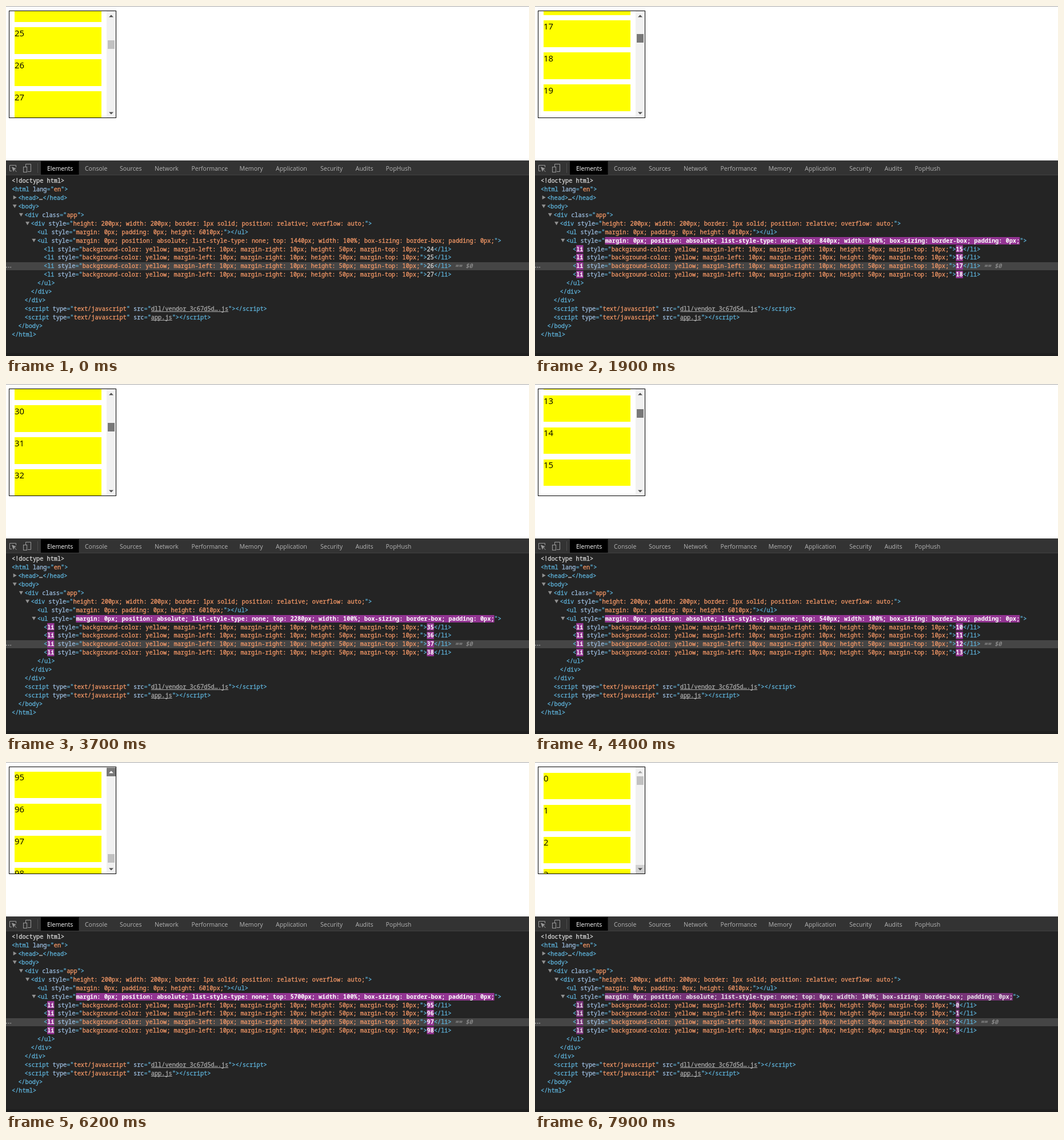
Recreate the animation shown at these times as an HTML page with a canvas. Size 915 by 612 pixels, loop 8 s.

```html
<!DOCTYPE html>
<html lang="en">
<head>
<meta charset="utf-8">
<title>Virtual list</title>
<style>
  html, body { margin: 0; width: 100%; height: 100%; overflow: hidden; background: #fff; }
  canvas { display: block; }
</style>
</head>
<body>
<canvas id="stage" width="915" height="612"></canvas>
<script>
const ctx = document.getElementById('stage').getContext('2d');
const LOOP = 8000, STEP = 100, FADE = 500;
const SCALE = 56 / 60, MAX = 5810, ROW = 14.93, LIST_TOP = 9.4;
const SANS = '"Open Sans", "Noto Sans", sans-serif';
const MONO = '10.25px "Noto Sans Mono", "DejaVu Sans Mono", monospace';
const COLORS = { t: '#5db0d7', n: '#9bbbdc', v: '#f29766', l: '#a8a8a8', w: '#d4d4d4', g: '#8c8c8c' };

// Scroll offset over time: [ms, px]
const PATH = [
  [0, 1480], [600, 1480], [700, 1440], [1200, 500], [1400, 560], [1700, 847], [1900, 1013],
  [2300, 1700], [2650, 2886], [3300, 2886], [3500, 2500], [4000, 700], [4150, 450],
  [4300, 640], [4400, 779], [4800, 3200], [5050, 5770], [5200, MAX], [5850, MAX],
  [6500, 5610], [6900, 5610], [7200, 3600], [7500, 500], [7600, 0], [LOOP, 0]
];

function scrollAt(t) {
  t = Math.max(0, t);
  const i = Math.max(1, PATH.findIndex(p => p[0] >= t));
  const [t0, a] = PATH[i - 1], [t1, b] = PATH[i];
  return a + (b - a) * (t - t0) / (t1 - t0);
}

const firstAt = t => Math.floor(scrollAt(t) / 60);
// The inspector trails the page slightly
const panelAt = t => ({ first: firstAt(t - 100), top: firstAt(t - 145) * 60 });

function flashAge(t) {
  for (let age = 0; age < FADE && t - age > 0; age += STEP) {
    const a = panelAt(t - age), b = panelAt(t - age - STEP);
    if (a.first !== b.first || a.top !== b.top) return age;
  }
  return FADE;
}

function flashAt(t) {
  const age = flashAge(t);
  if (age >= FADE) return null;
  const k = 1 - (1 - age / FADE) ** 1.5;
  const mix = (from, to) => `rgb(${from.map((v, i) => Math.round(v + (to[i] - v) * k))})`;
  return { back: mix([146, 52, 146], [48, 44, 50]), ink: mix([255, 255, 255], [185, 165, 190]) };
}

function rect(x, y, w, h, color) {
  ctx.fillStyle = color;
  ctx.fillRect(x, y, w, h);
}

function poly(color, ...pts) {
  ctx.fillStyle = color;
  ctx.beginPath();
  for (let i = 0; i < pts.length; i += 2) ctx.lineTo(pts[i], pts[i + 1]);
  ctx.fill();
}

function text(str, x, y, font, color) {
  ctx.font = font;
  ctx.fillStyle = color;
  ctx.fillText(str, x, y);
}

function arrowButton(y, dir, state, off) {
  const back = { press: '#787878', hover: '#d2d2d2' }[state];
  if (back) rect(176, y, 16, 15, back);
  const color = state === 'press' ? '#fff' : off ? '#a3a3a3' : '#505050';
  const m = y + 7.5;
  poly(color, 180, m - 2 * dir, 188, m - 2 * dir, 184, m + 2 * dir);
}

function drawPage(t) {
  const s = scrollAt(t), first = firstAt(t);
  rect(0, 0, 915, 270, '#fff');
  rect(0, 0, 915, 1, '#a6a6a6');

  ctx.save();
  ctx.beginPath();
  ctx.rect(6, 9, 170, 186);
  ctx.clip();
  for (let i = first; i < first + 4; i++) {
    const y = LIST_TOP + (60 * i + 10 - s) * SCALE;
    const top = Math.round(y), bottom = Math.round(y + 50 * SCALE);
    rect(15, top, 152, bottom - top, '#ff0');
    text(i, 15, Math.round(y + 15.7), '14.8px ' + SANS, '#000');
  }
  ctx.restore();

  const drag = (t >= 500 && t < 5500) || (t >= 6900 && t < 7700);
  rect(176, 9, 16, 186, '#f1f1f1');
  rect(178, Math.round(25 + 139 * s / MAX), 12, 15, drag ? '#787878' : '#c1c1c1');
  const up = t >= 5900 && t < 6800 ? 'press' : t === 6800 ? 'hover' : '';
  arrowButton(10, -1, up, s <= 0);
  arrowButton(180, 1, t >= 7800 ? 'hover' : '', s >= MAX);

  ctx.strokeStyle = '#000';
  ctx.lineWidth = 1;
  ctx.strokeRect(5.5, 8.5, 187, 187);
}

function drawToolbar() {
  rect(0, 270, 915, 26, '#333');
  rect(0, 270, 915, 1, '#454545');
  rect(0, 295, 915, 1, '#404040');
  rect(61, 271, 66.5, 24, '#000');
  rect(55, 275, 1, 17, '#4c4c4c');

  ctx.strokeStyle = '#9a9a9a';
  ctx.lineWidth = 1;
  ctx.beginPath();
  ctx.moveTo(10, 288.5);
  ctx.lineTo(6.5, 288.5);
  ctx.lineTo(6.5, 278.5);
  ctx.lineTo(17.5, 278.5);
  ctx.lineTo(17.5, 282);
  ctx.moveTo(14, 285.5);
  ctx.lineTo(18.5, 290);
  ctx.rect(34.5, 276.5, 9, 13);
  ctx.stroke();
  poly('#9a9a9a', 10, 281, 18, 284.5, 14.5, 286, 13, 290);
  rect(30, 281, 8, 10, '#333');
  ctx.strokeRect(30.5, 281.5, 6, 9);

  const tabs = [['Elements', 72], ['Console', 138], ['Sources', 199], ['Network', 260],
    ['Performance', 324.5], ['Memory', 408.5], ['Application', 472], ['Security', 550],
    ['Audits', 611.5], ['PopHush', 664.5]];
  tabs.forEach(([name, x], i) => text(name, x, 288, '10.5px ' + SANS, i ? '#b4b4b4' : '#fff'));
}

// Tokens: [text, color key, flashes]
function open(name, attrs = {}, hot = '') {
  const parts = Object.entries(attrs).flatMap(([key, val]) => [
    [' ' + key, 'n'], ['="', 't'], [val, key === 'src' ? 'l' : 'v', hot === key], ['"', 't']
  ]);
  return [['<', 't'], [name, 't', hot === 'tag'], ...parts, ['>', 't']];
}
const close = name => [[`</${name}>`, 't']];

function panelRows({ first, top }) {
  const li = 'background-color: yellow; margin-left: 10px; margin-right: 10px; height: 50px; margin-top: 10px;';
  const list = `margin: 0px; position: absolute; list-style-type: none; top: ${top}px; width: 100%; box-sizing: border-box; padding: 0px;`;
  const script = src => [...open('script', { type: 'text/javascript', src }), ...close('script')];
  const item = k => [...open('li', { style: li }, 'tag'), [String(first + k), 'w', true], ...close('li'),
    ...(k === 2 ? [[' == $0', 'g']] : [])];
  // [indent, tokens, twisty]
  return [
    [0, [['<!doctype html>', 'w']]],
    [0, open('html', { lang: 'en' })],
    [1, [...open('head'), ['…', 'w'], ...close('head')], 'shut'],
    [1, open('body'), 'open'],
    [2, open('div', { class: 'app' }), 'open'],
    [3, open('div', { style: 'height: 200px; width: 200px; border: 1px solid; position: relative; overflow: auto;' }), 'open'],
    [4, [...open('ul', { style: 'margin: 0px; padding: 0px; height: 6010px;' }), ...close('ul')]],
    [4, open('ul', { style: list }, 'style'), 'open'],
    ...[0, 1, 2, 3].map(k => [5, item(k)]),
    [4, close('ul')],
    [3, close('div')],
    [2, close('div')],
    [2, script('dll/vendor_3c67d5d….js')],
    [2, script('app.js')],
    [1, close('body')],
    [0, close('html')]
  ];
}

function drawTokens(tokens, x, mid, flash) {
  ctx.lineWidth = 0.3;
  for (const [str, kind, hot] of tokens) {
    const lit = hot && flash;
    ctx.font = (kind === 'g' ? 'italic ' : lit ? 'bold ' : '') + MONO;
    const w = ctx.measureText(str).width;
    if (lit) rect(x, Math.round(mid - 6.5), w, 13, flash.back);
    ctx.fillStyle = ctx.strokeStyle = lit ? flash.ink : COLORS[kind];
    ctx.fillText(str, x, mid + 3.6);
    // A hairline stroke gives the text its slightly heavy look
    if (!lit) ctx.strokeText(str, x, mid + 3.6);
    if (kind === 'l') rect(x, Math.round(mid + 5), w, 1, COLORS.l);
    x += w;
  }
}

function drawTree(t) {
  rect(0, 296, 915, 316, '#242424');
  rect(0, 607, 915, 5, '#1f1f1f');
  rect(0, 448, 915, 14, '#454545');
  for (const x of [0.5, 4, 7.5]) rect(x, 456, 1.5, 1.5, '#aaa');

  const flash = flashAt(t);
  panelRows(panelAt(t)).forEach(([indent, tokens, twisty], i) => {
    const x = 10 + 11.2 * indent, mid = 305.5 + ROW * i, c = x - 6;
    if (twisty === 'open') poly('#919191', c - 3.5, mid - 3, c + 3.5, mid - 3, c, mid + 3);
    if (twisty === 'shut') poly('#919191', c - 2.5, mid - 4, c + 3.5, mid - 0.5, c - 2.5, mid + 3);
    drawTokens(tokens, x, mid, flash);
  });
}

function frame(now) {
  const t = Math.floor(now % LOOP / STEP) * STEP;
  drawPage(t);
  drawToolbar();
  drawTree(t);
  requestAnimationFrame(frame);
}
requestAnimationFrame(frame);
</script>
</body>
</html>
```
